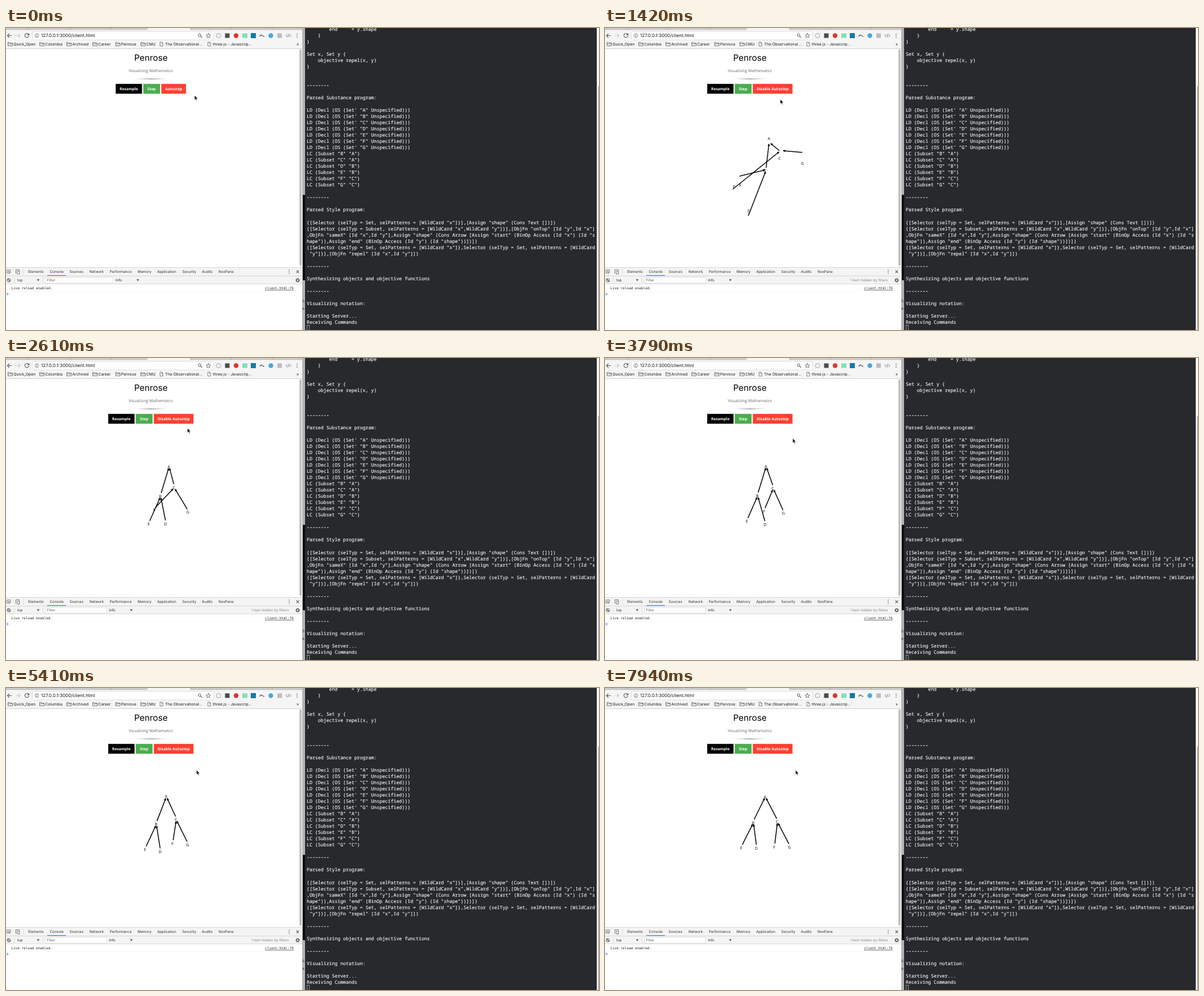
Animation, 1049 px wide and 534 px high, one loop 8000 ms. Source, as an HTML page:

```html
<!DOCTYPE html>
<html lang="en">
<head>
<meta charset="utf-8">
<title>Penrose</title>
<style>
  html, body { margin: 0; width: 100%; height: 100%; overflow: hidden; background: #fff; }
  svg { display: block; width: 1049px; height: 534px; }
  text { white-space: pre; text-rendering: geometricPrecision; }
  .ui { font: 6.9px Inter, sans-serif; fill: #1c1c1c; }
  .tool { font: 6.3px Inter, sans-serif; fill: #2c2c2c; }
  .title { font: 15.3px Inter, sans-serif; text-anchor: middle; }
  .page { font: 7px "Open Sans", sans-serif; text-anchor: middle; }
  .button { font-weight: 700; font-size: 6.7px; fill: #fff; }
  .log { font: 6.04px "DejaVu Sans Mono", monospace; fill: #222; }
  .term { font: 500 8.253px "Noto Sans Mono", monospace; fill: #f4f4f2; stroke: #f4f4f2; stroke-width: .15; }
  .line { fill: none; stroke: #555; stroke-width: 1.1; }
  .edge { stroke: #000; stroke-width: 1.5; marker-end: url(#head); }
</style>
</head>
<body>
<svg viewBox="0 0 1049 534">
  <defs>
    <marker id="head" viewBox="0 0 5 5" refX="4.5" refY="2.5" markerWidth="4.2" markerHeight="4.2"
      markerUnits="userSpaceOnUse" orient="auto"><path d="M0 0L5 2.5L0 5Z"/></marker>
    <linearGradient id="rule">
      <stop offset="0" stop-color="#888" stop-opacity="0"/>
      <stop offset=".5" stop-color="#777"/>
      <stop offset="1" stop-color="#888" stop-opacity="0"/>
    </linearGradient>
  </defs>
  <g id="chrome"></g>
  <g id="page">
    <text class="title" x="256.3" y="57.6">Penrose</text>
    <text class="page" x="256.3" y="78.2" fill="#666">Visualizing Mathematics</text>
    <rect x="229" y="89.4" width="55" height="1.2" fill="url(#rule)"/>
    <rect x="518.6" y="37" width="5" height="386" fill="#f4f4f4"/>
    <rect x="519.2" y="38" width="3.6" height="382" rx="1.8" fill="#bdbdbd"/>
  </g>
  <g id="idleButtons"></g>
  <g id="busyButtons"></g>
  <g id="graph"></g>
  <g id="tools"></g>
  <g id="plainFilter"></g>
  <g id="hiddenFilter"></g>
  <g id="terminal"></g>
  <path id="cursor" d="M0 0V8.2L1.9 6.4L3.3 9.4L4.6 8.8L3.2 5.9H5.7Z" stroke="#fff" stroke-width=".6"/>
</svg>
<script>
const $ = id => document.getElementById(id);

function add(parent, tag, attrs, content = "") {
  const node = document.createElementNS("http://www.w3.org/2000/svg", tag);
  for (const key in attrs) node.setAttribute(key, attrs[key]);
  node.textContent = content;
  return parent.appendChild(node);
}
const rect = (parent, x, y, width, height, fill, more) =>
  add(parent, "rect", { x, y, width, height, fill, ...more });
const text = (parent, cls, x, y, content, more) =>
  add(parent, "text", { class: cls, x, y, ...more }, content);
const line = (parent, d, more) => add(parent, "path", { class: "line", d, ...more });
const dot = (parent, cx, cy, r, fill, more) => add(parent, "circle", { cx, cy, r, fill, ...more });
const dots = (parent, x, y) => [-3, 0, 3].forEach(dy => dot(parent, x, y + dy, 0.8, "#555"));

function drawChrome() {
  const g = $("chrome");
  rect(g, 0, 0, 524, 37, "#f5f5f5");
  rect(g, 0, 0, 524, 3, "#cdcdcd");
  rect(g, 249, 0, 77, 3, "#f5f5f5");
  line(g, "M0 2.8H249M326 2.8H524", { style: "stroke:#aaa;stroke-width:.7" });
  [38, 112, 185, 249, 326, 397, 470].forEach(x =>
    line(g, `M${x} 0l2 3`, { style: "stroke:#999;stroke-width:.7" }));
  rect(g, 47, 6, 320, 15, "#fff", { stroke: "#d2d2d2", "stroke-width": 0.7, rx: 1.5 });
  line(g, "M10 13.5H2.5M6 10L2.5 13.5L6 17M40 11.4A3.6 3.6 0 1 0 40.5 14M40.6 9.5V12.3H37.8");
  line(g, "M17.5 13.5H25M21.5 10L25 13.5L21.5 17", { style: "stroke:#ccc" });
  dot(g, 54.5, 13.5, 3.3, "none", { stroke: "#666", "stroke-width": 0.8 });
  line(g, "M54.5 13V15.5M54.5 11.3V12.1");
  text(g, "ui", 62, 16.4, "127.0.0.1:3000/client.html", { style: "font-size:8.05px;fill:#111" });
  dot(g, 342.5, 12.6, 2.3, "none", { stroke: "#555" });
  line(g, "M344.2 14.3L347 17");
  line(g, "M358 9.2l1.1 2.9 3 .2-2.3 1.9.8 3-2.6-1.7-2.6 1.7.8-3-2.3-1.9 3-.2z", { style: "stroke-width:.8" });

  dot(g, 376, 13.5, 3.8, "none", { stroke: "#999", "stroke-width": 0.9 });
  rect(g, 387.5, 9.5, 8, 8, "#4c4c4c");
  dot(g, 407, 13.5, 4.2, "#e23527");
  rect(g, 418, 9.5, 9, 8, "#82dfb8");
  rect(g, 433, 9, 9, 9, "#147aa6");
  line(g, "M449 15q1.5-4 4-2t4 2", { style: "stroke-width:1.4" });
  dot(g, 468.5, 13.5, 4.2, "#4fa5dc");
  rect(g, 480, 9.5, 8, 8, "#bdbdbd");
  line(g, "M497.5 11L495 13.5L497.5 16M501.5 11L504 13.5L501.5 16M500.4 10.5L498.6 16.5", { style: "stroke-width:.8" });
  dots(g, 515, 13.5);

  const folders = { Quick_Open: 3, Columbia: 59, Archived: 107, Career: 153, Penrose: 193.5, CMU: 238 };
  for (const name in folders) {
    const x = folders[name];
    line(g, `M${x + .5} 31.5V25.5h3l1 1.2h4v4.8zM${x + .5} 28h8`, { style: "stroke:#666;stroke-width:.9" });
    text(g, "ui", x + 10.2, 31, name);
  }
  [[272.5, "The Observational..."], [357, "three.js - Javascrip..."]].forEach(([x, name]) => {
    line(g, `M${x} 25h3l2 2v5h-5zM${x + 3} 25v2h2`, { style: "stroke-width:.7" });
    text(g, "ui", x + 9, 31, name);
  });
  text(g, "ui", 514, 31, "»");
  rect(g, 0, 36.2, 524, 0.8, "#c9c9c9");
}

function drawButtons(g, list) {
  list.forEach(([x, width, fill, label]) => {
    rect(g, x, 98.8, width, 17.4, fill);
    text(g, "page button", x + width / 2, 109.5, label);
  });
}

function arrowDown(g, x) {
  add(g, "path", { d: `M${x - 2.2} 444.2h4.4l-2.2 3.6z`, fill: "#555" });
}

function drawTools() {
  const g = $("tools");
  rect(g, 0, 423, 524, 111, "#fff");
  rect(g, 0, 423, 524, 29.5, "#f4f4f4");
  [423, 438, 452].forEach(y => rect(g, 0, y, 524, 0.7, "#cacaca"));
  line(g, "M4 433.5H1.8V427.8H8V430M4 430l4.5 1.7-2 .8-.8 2z", { style: "stroke-width:.8" });
  line(g, "M17.5 434.5V427.5H23.5V429M20 430h4v5h-4z", { style: "stroke-width:.8" });
  rect(g, 30.5, 426, 0.7, 10, "#ccc");
  const tabs = { Elements: 39.3, Console: 77.5, Sources: 112.4, Network: 147.7, Performance: 183.5,
    Memory: 232.7, Application: 267.6, Security: 311.8, Audits: 346.6, NoxPane: 376 };
  for (const name in tabs) text(g, "tool", tabs[name], 433.3, name);
  rect(g, 73, 437, 33, 1.2, "#4285e8");
  dots(g, 501, 431);
  line(g, "M513.7 428.7l4.6 4.6m0-4.6l-4.6 4.6");
  dot(g, 5, 446, 3, "none", { stroke: "#555" });
  line(g, "M3 444L7 448");
  rect(g, 14.5, 441, 0.7, 10, "#d4d4d4");
  text(g, "tool", 20, 448.2, "top");
  arrowDown(g, 57);
  rect(g, 65, 441, 0.7, 10, "#d4d4d4");
  dot(g, 516, 446, 2.2, "none", { stroke: "#555", "stroke-width": 1.5 });
  dot(g, 516, 446, 3.4, "none", { stroke: "#555", "stroke-width": 1, "stroke-dasharray": "1.3 1.37" });
  text(g, "log", 9.5, 462, "Live reload enabled.");
  text(g, "log", 458, 462, "client.html:76", { "text-decoration": "underline" });
  rect(g, 0, 465.5, 524, 0.5, "#eee");
  line(g, "M1.5 468.4l2.2 2-2.2 2", { style: "stroke:#367cf1" });
}

function drawFilter(g, width) {
  rect(g, 70, 441, width, 10, "#fff", { stroke: "#d0d0d0", "stroke-width": 0.6 });
  text(g, "tool", 72.5, 448.2, "Filter", { style: "fill:#666" });
  text(g, "tool", 74.3 + width, 448.2, "Info");
  arrowDown(g, 113.7 + width);
}

function drawTerminal() {
  const g = $("terminal");
  rect(g, 524, 0, 5, 534, "#b4b4b4");
  rect(g, 525, 295, 4, 151, "#0c0d0e");
  text(g, "tool", 524, 485, "S.");
  text(g, "tool", 524, 498, "a.");
  rect(g, 529, 0, 516, 534, "#27292d");
  rect(g, 1045, 0, 4, 534, "#fafafa");
  rect(g, 1047, 103, 2, 431, "#bcbcbc");
  const sets = [..."ABCDEFG"].map(s => `LD (Decl (OS (Set' "${s}" Unspecified)))`);
  const subsets = ["BA", "CA", "DB", "EB", "FC", "GC"].map(([a, b]) => `LC (Subset "${a}" "${b}")`);
  const output = `        end     = y.shape
    }
}

Set x, Set y {
    objective repel(x, y)
}


--------

Parsed Substance program:

${[...sets, ...subsets].join("\n")}

--------

Parsed Style program:

([Selector {selTyp = Set, selPatterns = [WildCard "x"]}],[Assign "shape" (Cons Text [])])
([Selector {selTyp = Subset, selPatterns = [WildCard "x",WildCard "y"]}],[ObjFn "onTop" [Id "y",Id "x"]
,ObjFn "sameX" [Id "x",Id "y"],Assign "shape" (Cons Arrow [Assign "start" (BinOp Access (Id "x") (Id "s
hape")),Assign "end" (BinOp Access (Id "y") (Id "shape"))])])
([Selector {selTyp = Set, selPatterns = [WildCard "x"]},Selector {selTyp = Set, selPatterns = [WildCard
 "y"]}],[ObjFn "repel" [Id "x",Id "y"]])

--------

Synthesizing objects and objective functions

--------

Visualizing notation:

Starting Server...
Receiving Commands`;
  output.split("\n").forEach((row, i) => text(g, "term", 532, 4.9 + 11.02 * i, row));
  rect(g, 532.5, 525.5, 4.2, 9.5, "none", { stroke: "#bbb", "stroke-width": 0.8 });
}

// Node positions A..G, keyed by optimizer step.
const poses = [
  [2, [290, 195], [282, 251], [309, 230], [254.5, 323], [239.5, 277], [228, 280], [349, 239]],
  [10, [288, 192], [273, 244.5], [297, 229], [282, 293], [252.5, 293.5], [262, 268.5], [321.5, 272.5]],
  [18, [284.5, 191.5], [269.5, 243.5], [297, 230.5], [283, 294], [251, 288.5], [281.5, 271], [315.5, 274.5]],
  [29, [283, 192], [265, 240.5], [301, 233], [271.5, 289], [245.5, 285.5], [296, 275.5], [321.5, 277.5]],
  [38, [283, 192], [263, 239], [303.5, 235], [268, 284.5], [242, 283.5], [298.5, 279.5], [325, 279.5]],
  [46, [283, 192], [262, 238], [304.5, 236.5], [267.5, 283], [241, 282.5], [299.5, 281], [326, 281]],
];
// [from, to, early tail, early tip]
const edges = [
  [1, 0, [285, 247], [290, 205]], [2, 0, [308.5, 217], [293, 204]], [3, 1, [253.5, 332], [284, 254]],
  [4, 1, [238, 262], [283, 251]], [5, 2, [226, 285], [308, 219]], [6, 2, [349, 220], [315, 217]],
];
const mix = (a, b, k) => a.map((v, i) => v + (b[i] - v) * k);

// Exponential settling: 1 at step 2, 0 at step 10.
const unrest = step => step >= 10 ? 0 : (0.7 ** (step - 2) - 0.7 ** 8) / (1 - 0.7 ** 8);

function nodesAt(step) {
  let i = 0;
  while (i < poses.length - 2 && step >= poses[i + 1][0]) i++;
  const [[start, ...from], [end, ...to]] = [poses[i], poses[i + 1]];
  const k = i ? Math.min(1, (step - start) / (end - start)) : 1 - unrest(step);
  return from.map((p, n) => mix(p, to[n], k));
}
// Tails leave their label almost vertically; tips stop just short of theirs.
function restingEdge([x1, y1], [x2, y2]) {
  const d = Math.hypot(x2 - x1, y2 - y1), ux = (x2 - x1) / d, uy = (y2 - y1) / d;
  return [[x1 + 0.6 + 3 * ux, y1 + 6 * uy], [x2 + 0.6 - 3.2 * ux, y2 - 3.2 * uy]];
}
const shift = (p, rest, early, k) => p.map((v, i) => v + (early[i] - rest[i]) * k);

// Mouse positions as [key, x, y].
const approach = [[0, 333.5, 119], [150, 322, 116], [340, 309, 111], [530, 302, 108]];
const wander = [[0, 302, 109], [2, 310, 126], [7, 321, 124], [15, 321, 124], [18, 332, 142], [20, 337, 145]];
function mouseAt(time, step) {
  if (step < 0) return approach.filter(p => p[0] <= time).pop().slice(1);
  const i = wander.findIndex(p => p[0] > step);
  if (i < 0) return wander[wander.length - 1].slice(1);
  const [a, b] = [wander[i - 1], wander[i]];
  return mix(a, b, (step - a[0]) / (b[0] - a[0])).slice(1);
}

drawChrome();
drawButtons($("idleButtons"), [[194, 46.6, "#000", "Resample"], [242.8, 29.8, "#4aad4e", "Step"], [274.8, 43.6, "#fc4031", "Autostep"]]);
drawButtons($("busyButtons"), [[180.8, 46.6, "#000", "Resample"], [229.5, 29.8, "#4aad4e", "Step"], [261.5, 70.2, "#fc4031", "Disable Autostep"]]);
drawTools();
drawFilter($("plainFilter"), 119.5);
drawFilter($("hiddenFilter"), 108);
text($("hiddenFilter"), "tool", 433.5, 448.2, "1 item hidden by filters", { style: "fill:#888" });
drawTerminal();
const edgeNodes = edges.map(() => add($("graph"), "line", { class: "edge" }));
const labels = [..."ABCDEFG"].map(name => text($("graph"), "page", 0, 0, name));

const LOOP = 8000, AUTOSTEP = 1130, TICK = 148.04, CONNECTED = 340;
const show = (id, on) => $(id).style.display = on ? "" : "none";

function render(time) {
  const step = time < AUTOSTEP ? -1 : Math.min(46, Math.floor((time - AUTOSTEP + 7) / TICK));
  show("idleButtons", step < 0);
  show("busyButtons", step >= 0);
  show("plainFilter", time < CONNECTED);
  show("hiddenFilter", time >= CONNECTED);
  show("graph", time >= CONNECTED);

  const nodes = nodesAt(step), early = poses[0].slice(1), k = Math.min(1.4, unrest(step));
  labels.forEach((label, i) => {
    label.setAttribute("x", nodes[i][0]);
    label.setAttribute("y", nodes[i][1] + 2.5);
  });
  edges.forEach(([from, to, ...ends], i) => {
    const rest = restingEdge(early[from], early[to]);
    const [tail, tip] = restingEdge(nodes[from], nodes[to]).map((p, j) => shift(p, rest[j], ends[j], k));
    const attrs = { x1: tail[0], y1: tail[1], x2: tip[0], y2: tip[1] };
    for (const key in attrs) edgeNodes[i].setAttribute(key, attrs[key]);
  });
  $("cursor").setAttribute("transform", `translate(${mouseAt(time, step)})`);
}

let origin;
function frame(now) {
  origin ??= now;
  render((now - origin) % LOOP);
  requestAnimationFrame(frame);
}
render(0);
requestAnimationFrame(frame);
</script>
</body>
</html>
```
